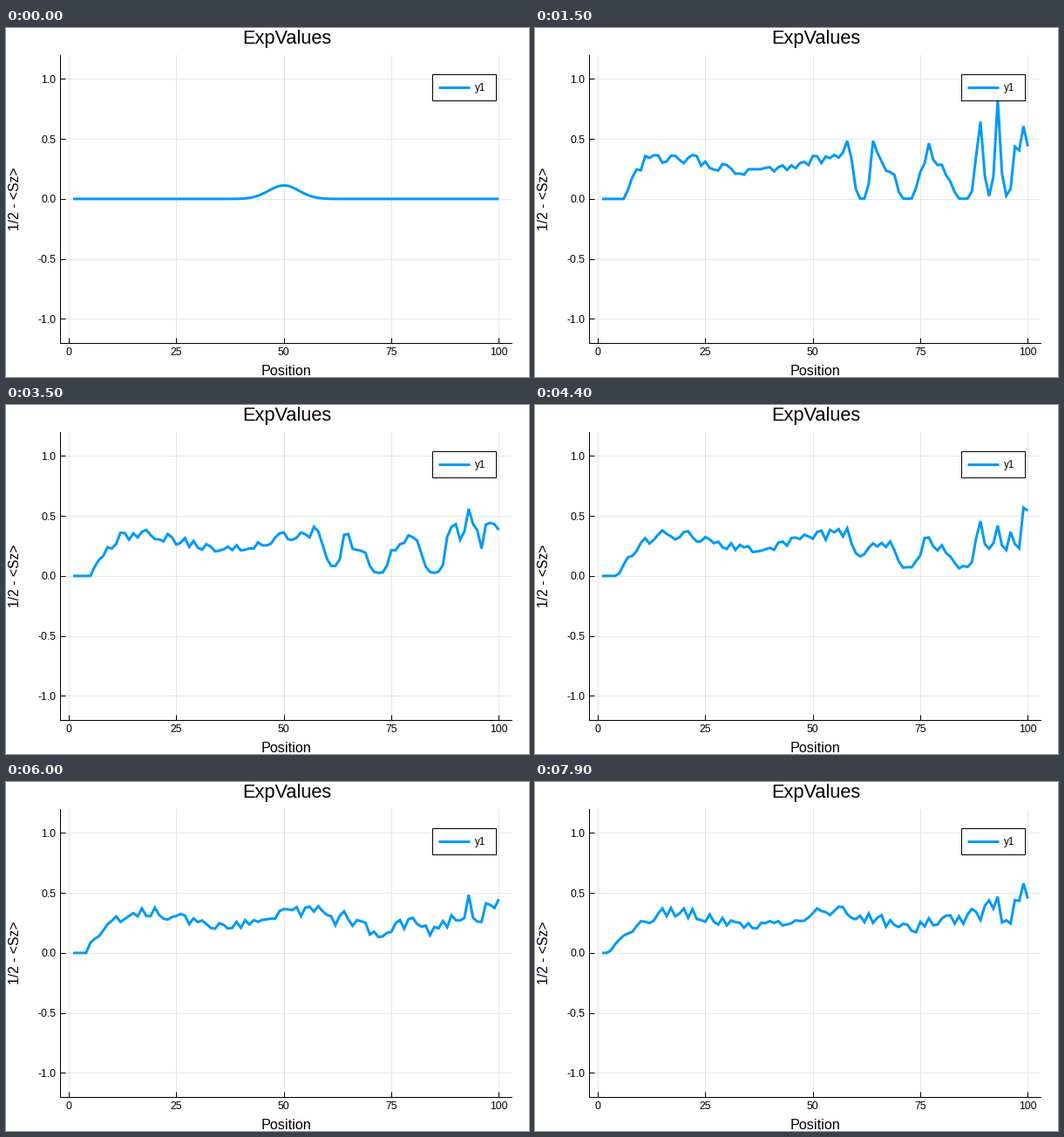
Write a matplotlib script that moves like this. It is 600 px wide and 400 px high and loops after 8000 ms.

```python
import numpy as np
import matplotlib.pyplot as plt
from matplotlib.animation import FuncAnimation
from matplotlib.patches import Rectangle

W, H, DPI = 600, 400, 100
FRAMES, STEP = 80, 100
PX = 72 / DPI
BLUE = "#009AF9"
plt.rcParams["font.family"] = "Liberation Sans"

sites = np.arange(1, 101)
rng = np.random.default_rng(11)

# Neighbouring sites swing in nearly opposite phase, more strongly to the right
period = rng.uniform(1.0, 2.4, sites.size)
phase = np.pi * sites + rng.normal(0, 0.9, sites.size)
ripple = 0.04 + 0.07 * np.clip((sites - 60) / 35, 0, 1)

# Dips: centre, width, time by which they have half filled in
DIPS = [(61.4, 2.3, 4.2), (72, 2.8, 5.2), (85, 3, 5.5), (91, 1.4, 2.5), (95, 1.4, 2.5)]
# Crests: centre, half width, height at the start
CRESTS = [(58, 3, 0.25), (64, 1.4, 0.45), (77, 4, 0.4),
          (89, 1.3, 0.9), (93, 1.3, 0.9), (99, 1.3, 0.3)]


def profile(frame):
    if frame == 0:
        return 0.113 * np.exp(-((sites - 50) / 3.53) ** 2 / 2)
    t = frame * STEP / 1000
    base = 0.285 + 0.06 * np.cos(2 * np.pi * (sites - 17) / 38)
    base[-2:] += 0.15
    for centre, width, fill in DIPS:
        depth = 1 / (1 + (t / fill) ** 5)
        base *= 1 - depth * np.exp(-((sites - centre) / width) ** 4)
    for centre, width, height in CRESTS:
        base += height * np.exp(-t / 2) * np.clip(1 - abs(sites - centre) / width, 0, 1)
    # the left front creeps outwards and softens
    front = 7.5 - 0.58 * t
    base *= np.sqrt(np.clip((sites - front) / (2.5 + 1.2 * t), 0, 1))
    wave = ripple * np.sin(2 * np.pi * t / period + phase)
    return np.clip(base + wave * np.minimum(1, base / 0.3) ** 1.5, 0, 1)


fig = plt.figure(figsize=(W / DPI, H / DPI), dpi=DPI, facecolor="white")
left, right, top, bottom = 62.4, 580, 31, 360.8
ax = fig.add_axes([left / W, 1 - bottom / H, (right - left) / W, (bottom - top) / H])
ax.set_xlim(-1.97, 102.97)
ax.set_ylim(-1.2, 1.2)
ax.set_xticks([0, 25, 50, 75, 100])
ax.set_yticks([-1, -0.5, 0, 0.5, 1])
ax.yaxis.set_major_formatter(lambda v, _: f"{v:.1f}")
ax.tick_params(direction="in", length=6 * PX, width=PX, pad=5 * PX, labelsize=12.2 * PX)
ax.grid(color="#e6e6e6", linewidth=PX)
ax.set_axisbelow(True)
for side, spine in ax.spines.items():
    spine.set_visible(side in ("left", "bottom"))
    spine.set_linewidth(PX)


def label(x, y, text, size, **kw):
    fig.text(x / W, 1 - y / H, text, fontsize=size * PX, **kw)


label(322.5, 18, "ExpValues", 21.8, ha="center", va="baseline")
label(321.5, 398, "Position", 16.2, ha="center", va="baseline")
label(18.5, 195.5, "1/2 - <Sz>", 15.8, ha="right", va="center", rotation=90)

stroke = dict(color=BLUE, lw=3 * PX, solid_capstyle="butt", solid_joinstyle="miter")
line, = ax.plot(sites, profile(0), **stroke)

# Legend
fig.add_artist(Rectangle((489 / W, 1 - 83 / H), 73 / W, 30 / H, facecolor="white",
                         edgecolor="black", lw=PX))
fig.add_artist(plt.Line2D([496 / W, 532 / W], [1 - 68 / H] * 2, **stroke))
label(538, 72, "y1", 11.6, va="baseline", zorder=5)


def update(frame):
    line.set_ydata(profile(frame))
    return line,


anim = FuncAnimation(fig, update, frames=FRAMES, interval=STEP, repeat=True, repeat_delay=0)
plt.show()
```
